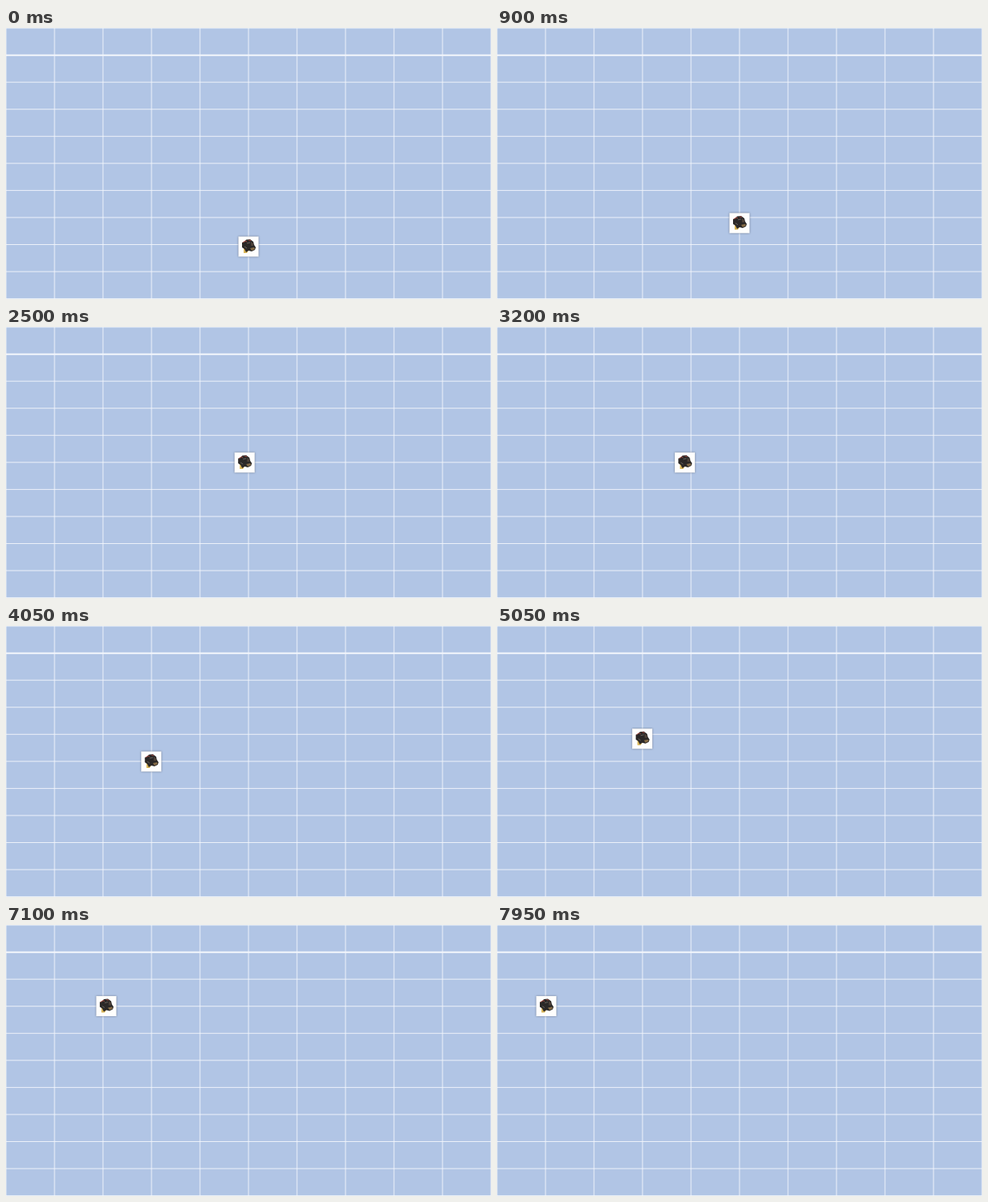
Write an HTML page that moves like this. It is 600 by 336 pixels and loops after 8 s.

```html
<!DOCTYPE html>
<html lang="en">
<head>
<meta charset="utf-8">
<title>Tile on a grid</title>
<style>
  html, body { margin: 0; width: 100%; height: 100%; overflow: hidden; background: #b1c5e5; }
  svg { display: block; width: 600px; height: 336px; }
  #grid { stroke: #f3f6fc; stroke-width: 0.9; fill: none; }
  #tile { filter: drop-shadow(0 0.8px 1px rgba(40, 50, 70, 0.6)); }
</style>
</head>
<body>
<svg viewBox="0 0 600 336">
  <rect width="600" height="336" fill="#b1c5e5"/>
  <g id="grid"></g>
  <g id="tile">
    <rect x="-12.5" y="-12.5" width="25" height="25" fill="#fefefd"/>
    <!-- small robot car -->
    <path d="M-6 2 L-3 1 L0 5 L-2 8 L-6 8Z" fill="#d9b557"/>
    <path d="M-8 -5 L-5 -6 L-3 -8.5 L2 -9 L6 -6 L7 -2 L9 1 L8 4 L4 6 L0 5 L-3 7 L-5 3 L-8 1Z" fill="#2b2827"/>
    <path d="M3 -6 L6 -4 L6 -1 L3 -1Z" fill="#4d4138"/>
    <path d="M2 2 L7 1 L8 3 L4 5Z" fill="#856b46"/>
    <path d="M-7 -5 L-4 -7 L-2 -6 M0 -8 L3 -7.5" fill="none" stroke="#a4483f"/>
    <path d="M-2 -4 L2 -5 M-5 0 L-2 2" fill="none" stroke="#77716b" stroke-width="0.8"/>
  </g>
</svg>
<script>
const LOOP = 8000, STEP = 50;
const LEG = 2000, DELAY = 160, MOVE = 1950;
const stops = [[300, 271], [300, 168], [179.7, 168], [179.7, 100.6], [60.4, 100.6]];
const grid = document.getElementById("grid");
const tile = document.getElementById("tile");

function addLine(d, width) {
  const line = document.createElementNS("http://www.w3.org/2000/svg", "path");
  line.setAttribute("d", d);
  if (width) line.setAttribute("stroke-width", width);
  grid.append(line);
}

for (let i = 0; i <= 10; i++) {
  addLine(`M${i * 60} 0V336`);
  addLine(`M0 ${i * 33.55 + 0.1}H600`, i === 1 ? 2 : 0);
}

const ease = u => u * u * u * (10 + u * (6 * u - 15));

function position(time) {
  const [x, y] = stops[0];
  const point = [x, y];
  for (let i = 1; i < stops.length; i++) {
    const start = DELAY + (i - 1) * LEG;
    const p = ease(Math.min(1, Math.max(0, (time - start) / MOVE)));
    for (const axis of [0, 1]) point[axis] += (stops[i][axis] - stops[i - 1][axis]) * p;
  }
  return point;
}

function draw(now) {
  const time = Math.floor((now % LOOP) / STEP) * STEP;
  const [x, y] = position(time);
  tile.setAttribute("transform", `translate(${x.toFixed(2)} ${y.toFixed(2)})`);
}

const began = performance.now();
function tick() {
  draw(performance.now() - began);
  requestAnimationFrame(tick);
}
tick();
</script>
</body>
</html>
```
